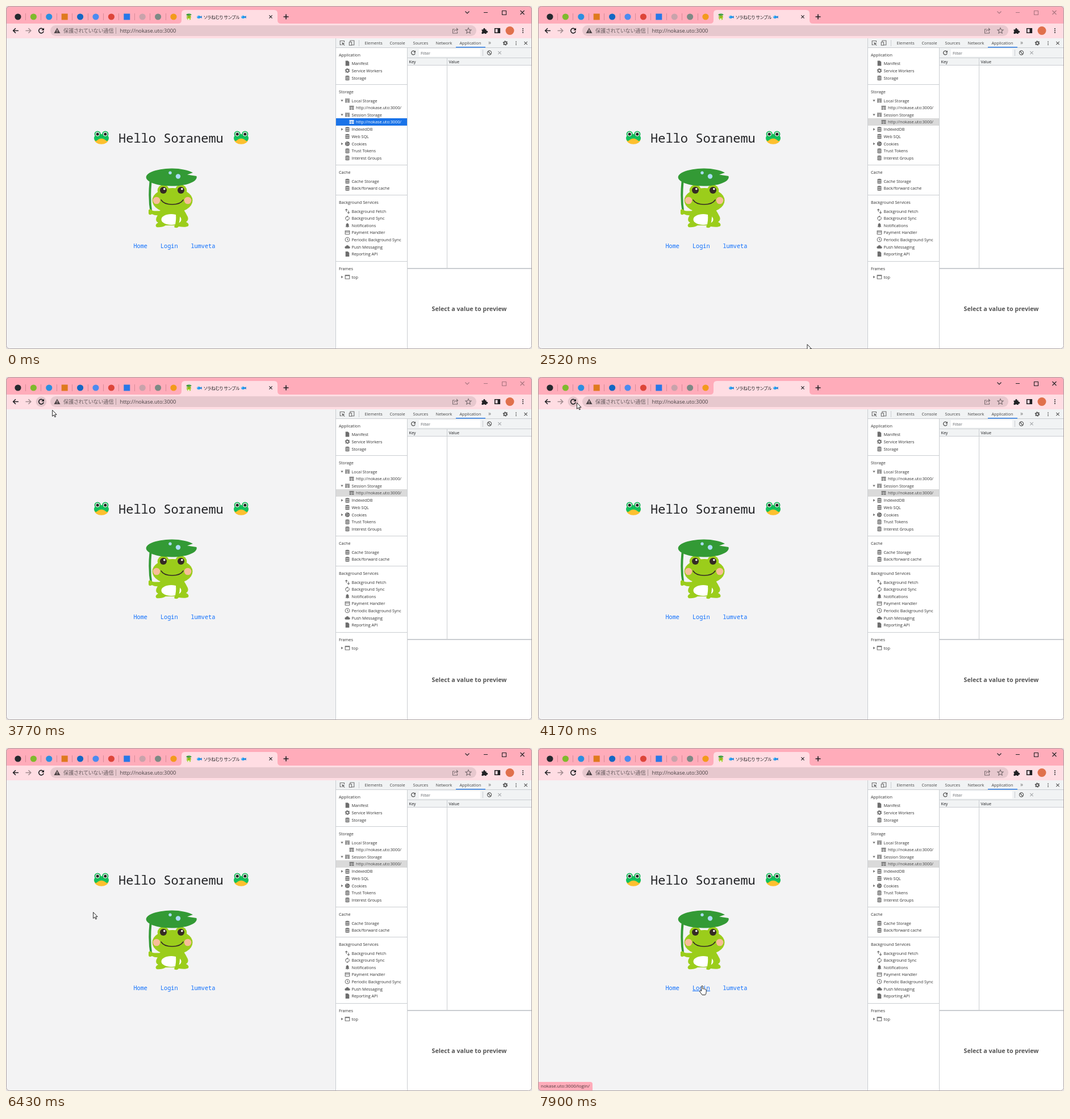
Animation, 926 px wide and 605 px high, one loop 8 s. Source, as an HTML page:

```html
<!DOCTYPE html>
<html lang="ja">
<head>
<meta charset="utf-8">
<title>Browser demo</title>
<style>
html, body { margin: 0; width: 100%; height: 100%; overflow: hidden; background: #e4e0e1; }
svg { display: block; }
text { font: 7.25px "Open Sans", "Noto Sans", sans-serif; fill: currentColor; white-space: pre; }
.jp { font-family: "Noto Sans CJK JP", "Noto Sans CJK", sans-serif; font-feature-settings: "palt"; }
.mono { font-family: "Noto Sans Mono", "DejaVu Sans Mono", monospace; }
.hint { font-weight: 700; }
.line { fill: none; stroke: currentColor; stroke-width: 1.1; }
.bold { stroke-width: 1.6; }
</style>
</head>
<body>
<svg id="stage" width="926" height="605" viewBox="0 0 926 605"></svg>
<script>
const HOST = 'nokase.uto:3000';
const GRAY = '#6e6e6e', DARK = '#202124', RULE = '#cacdd1';

const rect = (x, y, w, h, fill, more = '') => `<rect x="${x}" y="${y}" width="${w}" height="${h}" fill="${fill}" ${more}/>`;
const dot = (x, y, r, fill) => `<circle cx="${x}" cy="${y}" r="${r}" fill="${fill}"/>`;
const oval = (x, y, rx, ry, fill) => `<ellipse cx="${x}" cy="${y}" rx="${rx}" ry="${ry}" fill="${fill}"/>`;
const path = (d, fill) => `<path d="${d}" fill="${fill}"/>`;
const line = (d, cls = '', more = '') => `<path class="line ${cls}" d="${d}" ${more}/>`;
const text = (x, y, s, size = 7.25, cls = '', more = '') =>
  `<text x="${x}" y="${y}" class="${cls}" style="font-size:${size}px" ${more}>${s}</text>`;
const at = (x, y, body, color = DARK, id = '') =>
  `<g transform="translate(${x} ${y})" color="${color}" ${id && `id="${id}"`}>${body}</g>`;
const solid = d => path(d, 'currentColor');

// Icons are centred on the origin and take the current colour.
const cross = r => line(`M${-r} ${-r}L${r} ${r}M${r} ${-r}L${-r} ${r}`);
const dots = [-3.2, 0, 3.2].map(y => dot(0, y, 1, 'currentColor')).join('');
const reload = line('M3.2-2.6A4.2 4.2 0 1 0 4.1 1', 'bold') + solid('M5-5v4.6H.4z');
const icon = {
  db: solid('M-3.7-2.6Q-3.7-4.2 0-4.2T3.7-2.6Q3.7-1.7 0-1.7T-3.7-2.6zM-3.7-1.3Q0-.2 3.7-1.3V.4Q3.7 1.3 0 1.3T-3.7.4zM-3.7 1.7Q0 2.8 3.7 1.7V3Q3.7 4.2 0 4.2T-3.7 3z'),
  table: solid('M-4-3.5h8v1.8h-8zM-4-1.1h3.6v1.8h-3.6zM.3-1.1H4v1.8H.3zM-4 1.4h3.6v1.9h-3.6zM.3 1.4H4v1.9H.3z'),
  file: solid('M-3.3-4.5h4.3l2.3 2.3v6.7h-6.6z'),
  gear: '<circle r="2.4" class="line bold"/><circle r="3.5" class="line bold" stroke-dasharray="1.83"/>',
  cookie: dot(0, 0, 4, 'currentColor') + dot(-1, -1.5, .8, '#fff') + dot(1.6, .2, .8, '#fff') + dot(-1, 1.8, .7, '#fff'),
  fetch: line('M-1.8 1V-3.6M-3.6-1.8L-1.8-3.8L0-1.8M2-1V3.6M.2 1.8L2 3.8L3.8 1.8'),
  sync: line('M-2.6 2.2A3.4 3.4 0 0 1 0-3.2M2.6-2.2A3.4 3.4 0 0 1 0 3.2') + solid('M-.2-5v3.6L2-3.2zM.2 5V1.4L-2 3.2z'),
  bell: solid('M-3.5 2.8L-2.5 1.5V-1Q-2.3-3.2-.6-3.6Q0-4.8.6-3.6Q2.3-3.2 2.5-1V1.5L3.5 2.8zM-1 3.2h2q-1 1.6-2 0z'),
  card: line('M-3.8-3h7.6v6h-7.6zM-3.8-.9h7.6'),
  clock: '<circle r="3.8" class="line"/>' + line('M0-2.3V.2L1.7 1.3'),
  cloud: solid('M-2.5 2.8a2 2 0 0 1-.2-4A2.9 2.9 0 0 1 2.7-1a1.9 1.9 0 0 1 .3 3.8z'),
  frame: line('M-3.8-3.2h7.6v6.4h-7.6zM-3.8-2.2h7.6')
};

// A row of the storage tree: centre height, icon, label, fold state, indent.
const row = (y, name, label, fold, indent = 0) =>
  at(601 + indent, y, icon[name], 'inherit') + text(608.5 + indent, y + 2.6, label, 7.25, '', 'color="#333"') +
  (fold ? at(591.5, y, solid(fold === 'open' ? 'M-2.2-1.5h4.4L0 1.8z' : 'M-1.3-2.2v4.4L2 0z'), GRAY) : '');

const emoji = (x, y) => at(x, y,
  oval(0, 3.2, 12.3, 8.6, '#fdc02f') +
  path('M-13 1Q-13-6 0-6T13 1Q13 5 9.5 6.2Q4 1.8 0 1.8T-9.5 6.2Q-13 5-13 1z', '#12c25c') +
  [-6.8, 6.8].map(e => dot(e, -6, 5.6, '#12b956') + dot(e, -6, 3.7, '#fff') + dot(e, -6, 2.6, '#222')).join('') +
  dot(-1.6, -2, .6, '#0b8043') + dot(1.6, -2, .6, '#0b8043'));

const frog = () => {
  const green = '#9bcd1b', leaf = '#339a35';
  const eye = x => dot(x, 325.5, 10.3, green) + dot(x, 325, 6, '#352b24') + dot(x + 1.8, 322.8, 1.8, '#fff');
  return path('M252.5 310Q249.5 340 254 365L257.5 364Q253.5 340 256.5 310z', leaf) +
    path('M273 358Q268 366 264.5 374Q263 380 268 382Q261 386 265 390Q274 391 281 387H297L296 390Q301 393 304 389Q317 391 321 388Q323 384 317 381Q322 378 320 372Q316 364 312 358z', green) +
    path('M251 360Q254 356 258 361Q264 362 274 361L270 369Q262 370 257 367Q252 370 251 366z', green) +
    oval(291, 376.5, 17.5, 9.5, '#fff') +
    path('M306 366Q307 379 302 390L297 389Q300 378 299 368z', green) +
    oval(293, 343, 35.5, 22, green) + eye(277) + eye(308) +
    dot(265, 343, 6.3, '#f8bd99') + dot(320, 343, 6.3, '#f8bd99') +
    line('M273 342Q278 350 292.5 350T312 342', 'bold', 'color="#352b24" stroke-linecap="round"') +
    path('M319 297.5L329 293.9A44.5 15.5 0 1 0 335.3 300Z', leaf) +
    dot(289, 294.3, 2.7, '#a9dcf5') + dot(303, 300.5, 4.2, '#a9dcf5');
};

const fish = x => at(x, 19.5, oval(-.6, 0, 3.2, 2.5, '#1e9bf0') + path('M1.5 0L4.6-2.6V2.6z', '#1577cf') + dot(-2.2, -.6, .6, '#fff'));

function tabStrip() {
  const marks = ['#24292e', '#7fba2c', '#2b8fe0', '#df7a1e', '#1267c4', '#4c8bf0', '#dd4539', '#2878e8', '#c8a3ab', '#7d8a85', '#f39a1c'];
  const favicons = marks.map((c, i) => {
    const x = 21 + i * 27.4;
    return (i === 3 || i === 7 ? rect(x - 5.5, 13.5, 11, 11, c) : dot(x, 19, 5.6, c)) +
      (i < 10 ? rect(Math.round(x + 13), 13, 1, 12, '#d98a98') : '');
  }).join('');
  return rect(0, 0, 926, 31, '#ffacba') + favicons +
    path('M303 31Q309 31 309 25V13Q309 7 315 7H472Q478 7 478 13V25Q478 31 484 31z', '#ffdde3') +
    `<g id="favicon" transform="translate(322 19) scale(.105) translate(-291 -339)">${frog()}</g>` +
    at(322, 19, '<path id="spin" class="line bold" d="M0-4.5A4.5 4.5 0 0 1 4.5 0"/>', '#5d6068') +
    fish(340) + fish(418) + text(348, 22.5, 'ソラねむり サンプル', 7.6, 'jp') +
    at(466, 19, cross(2.6)) + at(493, 19, line('M-4.5 0h9M0-4.5v9', 'bold')) +
    `<g id="controls">${line('M808.5 9.5L812 13L815.5 9.5M841 11.5h7M873.5 8.5h7v7h-7zM905.5 8l7 7M912.5 8l-7 7')}</g>`;
}

function toolbar() {
  const arrow = 'M5 0H-4M0-4.3L-4.3 0L0 4.3';
  return rect(0, 31, 926, 26, '#ffdde3') + rect(78, 34, 750, 19, '#e7c8ce', 'rx="9.5"') +
    `<g id="hover">${dot(62, 43.5, 9.3, '#e3c4ca')}</g>` +
    at(17, 43.5, line(arrow, 'bold')) +
    at(39.5, 43.5, line(arrow, 'bold', 'transform="scale(-1 1)"'), '#a08b8f') +
    at(62, 43.5, reload, DARK, 'reload') + at(62, 43.5, cross(3.7), DARK, 'stop') +
    at(90, 43.5, solid('M0-5L5.5 4.5h-11z') + rect(-.6, -1.8, 1.2, 3.2, '#e7c8ce') + rect(-.6, 2.2, 1.2, 1.2, '#e7c8ce'), '#4d4447') +
    text(101, 47, '保護されていない通信', 9.2, 'jp', 'color="#6b5d61"') + rect(193, 38, 1, 11, '#ae9399') +
    text(200.5, 47, 'http://' + HOST, 9.27, '', 'color="#4a4144"') +
    at(791, 43.5, line('M-1-2.5H-4.5V4.5H3.5V1.5M-2 1.5Q-1-2 4-2M2-4.5L4.5-2L2 .5'), '#7b6c70') +
    at(814, 43.5, line('M0-5L1.5-1.6L5-1.3L2.3 1L3.2 4.5L0 2.6L-3.2 4.5L-2.3 1L-5-1.3L-1.5-1.6z'), '#7b6c70') +
    at(842, 44, solid('M-4.5-2.5H-1.6A1.7 1.7 0 1 1 1.5-2.5H3.7V0A1.7 1.7 0 1 1 3.7 3V5H1.2A1.6 1.6 0 0 0-1.8 5H-4.5V2.2A1.6 1.6 0 0 0-4.5-.6z')) +
    at(865, 43.5, line('M-4.3-3.7h8.6v7.4h-8.6z', 'bold') + rect(.5, -4, 4, 8, 'currentColor')) +
    dot(887, 43.5, 7.5, '#e0704c') + at(910, 43.5, dots);
}

function page() {
  return rect(0, 57, 581, 548, '#f3f3f4') + emoji(168, 232) + emoji(414, 232) +
    text(198, 240.5, 'Hello Soranemu', 22, 'mono') + frog() +
    `<g color="#0d6efd">${text(224.5, 426.5, 'Home', 10.2, 'mono')}${text(272, 426.5, 'Login', 10.2, 'mono')}` +
    `${text(325.5, 426.5, 'lumveta', 10.2, 'mono')}${rect(272, 428, 31, 1, 'currentColor', 'id="underline"')}</g>`;
}

function sidebar() {
  const heads = [[86, 'Application'], [151.5, 'Storage'], [293.5, 'Cache'], [346, 'Background Services'], [463, 'Frames']];
  const url = `http://${HOST}/`;
  const rows = [
    [101, 'file', 'Manifest'], [114, 'gear', 'Service Workers'], [127, 'db', 'Storage'],
    [167, 'table', 'Local Storage', 'open'], [179.5, 'table', url, '', 7.5], [192, 'table', 'Session Storage', 'open'],
    [217.5, 'db', 'IndexedDB', 'shut'], [230, 'db', 'Web SQL'], [243, 'cookie', 'Cookies', 'shut'],
    [255.5, 'db', 'Trust Tokens'], [268, 'db', 'Interest Groups'],
    [309, 'db', 'Cache Storage'], [321.5, 'db', 'Back/forward cache'],
    [362, 'fetch', 'Background Fetch'], [374.5, 'sync', 'Background Sync'], [387, 'bell', 'Notifications'],
    [399.5, 'card', 'Payment Handler'], [412, 'clock', 'Periodic Background Sync'], [425, 'cloud', 'Push Messaging'],
    [437.5, 'file', 'Reporting API'], [478, 'frame', 'top', 'shut']
  ];
  return heads.map(([y, s]) => text(586, y + 2.6, s, 7.25, '', 'color="#333"')).join('') +
    [138, 280, 333, 450].map(y => rect(581, y, 125, 1, RULE)).join('') +
    rect(581, 198, 125, 13, '#dadada', 'id="selection"') +
    `<g color="${GRAY}">${rows.map(r => row(...r)).join('')}<g id="selected">${row(204.5, 'table', url, '', 7.5)}</g></g>`;
}

function devtools() {
  const tabs = [[631.5, 'Elements'], [675.5, 'Console'], [716.5, 'Sources'], [756.5, 'Network'], [798.5, 'Application']];
  return rect(581, 57, 345, 548, '#fff') + rect(581, 57, 345, 17, '#f1f3f4') + rect(707, 74, 219, 31, '#f1f3f4') +
    rect(580, 57, 1, 548, RULE) + rect(581, 73, 345, 1, RULE) + rect(706, 74, 1, 531, RULE) +
    rect(707, 91, 219, 1, RULE) + rect(707, 104, 219, 1, RULE) + rect(776, 91, 1, 372, RULE) + rect(707, 462, 219, 2, RULE) +
    at(592, 65, line('M-1 3.5H-3.8V-3.5H3.5V-1') + solid('M-1-1L4.5 1L2.3 2L4.5 4.2L3.8 5L1.6 2.7L.7 4.8z'), GRAY) +
    at(608.5, 65, line('M-2.5-1.5V-4H4.3V3.8H.5M-4.2-1.2H0V4.2H-4.2z'), GRAY) + rect(621, 60, 1, 11, RULE) +
    tabs.map(([x, s]) => text(x, 68, s, 7.25, '', 'color="#444"')).join('') + rect(792, 72, 52, 1.3, '#1a73e8') +
    text(849, 68, '»', 10, '', `color="${GRAY}"`) + at(879, 65.5, icon.gear, '#555') +
    at(898, 65.5, `<g transform="scale(.85)">${dots}</g>`, '#555') + at(915, 65.5, cross(2.7), '#555') +
    at(717, 82.5, `<g transform="scale(.8)">${reload}</g>`, '#555') + rect(727, 76, 108, 13, '#fff') +
    text(730, 85.5, 'Filter', 7.25, '', 'color="#5f6368"') + rect(839, 77, 1, 11, RULE) +
    at(851, 82.5, '<circle r="3.6" class="line"/>' + line('M-2.5-2.5l5 5'), '#555') + at(869, 82.5, cross(2.7), '#a5a8ab') +
    text(709.5, 100.5, 'Key') + text(779.5, 100.5, 'Value') + sidebar() +
    text(815.5, 538, 'Select a value to preview', 10.7, 'hint', 'color="#555" text-anchor="middle"');
}

const overlays =
  `<g id="status">${path('M0 589H92Q96 589 96 593V605H0z', '#ffacba')}${text(5, 599, HOST + '/login/', 8, '', 'color="#4a3a3e"')}</g>` +
  `<g id="tip">${rect(75.5, 55.5, 124, 17, '#fff', 'stroke="#b8b8b8"')}${text(80, 67, 'このページを再読み込みします', 8.8, 'jp', 'color="#555"')}</g>`;
const pointers = `<g id="pointer" fill="#fff" stroke="#111" stroke-width=".9" stroke-linejoin="round">
  <path id="arrow" d="M.5.5V11.3L3 9L4.8 12.8L6.4 12.1L4.7 8.4H8z"/>
  <path id="hand" d="M-1.2 9.5V1.2Q0-.8 1.2 1.2V6Q2.3 4.8 3.4 6.3Q4.6 5.3 5.5 6.8Q6.8 6.2 7.2 7.8V11.5Q7 14.5 5.5 16.5H0L-4 11Q-5 9-3.2 8.7z"/></g>`;

const stage = document.getElementById('stage');
stage.innerHTML = `<clipPath id="round">${rect(0, 0, 926, 605, '#000', 'rx="6"')}</clipPath>
  <g clip-path="url(#round)" color="${DARK}">${tabStrip()}${toolbar()}${page()}${devtools()}${overlays}</g>
  ${rect(.5, .5, 925, 604, 'none', 'rx="6" stroke="#aaa0a2"')}${pointers}`;

// Pointer paths as [ms, x, y]; the pointer is hidden between them.
const trips = [
  [[510, 885, 465], [650, 851, 397], [830, 851, 397], [850, 872, 405], [1260, 661, 577]],
  [[2520, 474, 597], [3160, 165, 154], [3300, 122, 98], [3340, 122, 98], [3910, 68, 45], [5870, 68, 45],
    [6430, 153, 289], [6640, 181, 338], [7480, 287, 415], [7900, 289, 419], [8000, 289, 419]]
];

function pointerAt(t) {
  const trip = trips.find(p => t >= p[0][0] && t < p[p.length - 1][0]);
  if (!trip) return null;
  const i = trip.findIndex(k => k[0] > t), [t0, x0, y0] = trip[i - 1], [t1, x1, y1] = trip[i];
  const f = (t - t0) / (t1 - t0);
  return [x0 + (x1 - x0) * f, y0 + (y1 - y0) * f];
}

const $ = id => document.getElementById(id);
const show = (id, on) => $(id).setAttribute('visibility', on ? 'visible' : 'hidden');
const between = (t, a, b) => t >= a && t < b;

function draw(t) {
  const blurred = between(t, 250, 4050), chosen = t < 250, overLink = t >= 7410;
  const stopping = between(t, 4240, 5960);
  $('controls').setAttribute('color', blurred ? '#a8747f' : DARK);
  $('selection').setAttribute('fill', chosen ? '#1a73e8' : '#dadada');
  $('selected').setAttribute('color', chosen ? '#fff' : GRAY);
  $('selected').querySelector('text').setAttribute('color', chosen ? '#fff' : '#444');
  $('stop').setAttribute('color', t < 4950 ? DARK : '#9b878b');
  $('spin').setAttribute('transform', `rotate(${-t * .36})`);
  show('favicon', !between(t, 4120, 5160));
  show('spin', between(t, 4240, 5090));
  show('hover', between(t, 3700, 4240));
  show('reload', !stopping);
  show('stop', stopping);
  show('tip', between(t, 5690, 5960));
  show('underline', overLink);
  show('status', t >= 7620);
  const p = pointerAt(t);
  show('arrow', p && !overLink);
  show('hand', p && overLink);
  if (p) $('pointer').setAttribute('transform', `translate(${p})`);
}

const start = performance.now();
(function tick() {
  draw((performance.now() - start) % 8000);
  requestAnimationFrame(tick);
})();
</script>
</body>
</html>
```
